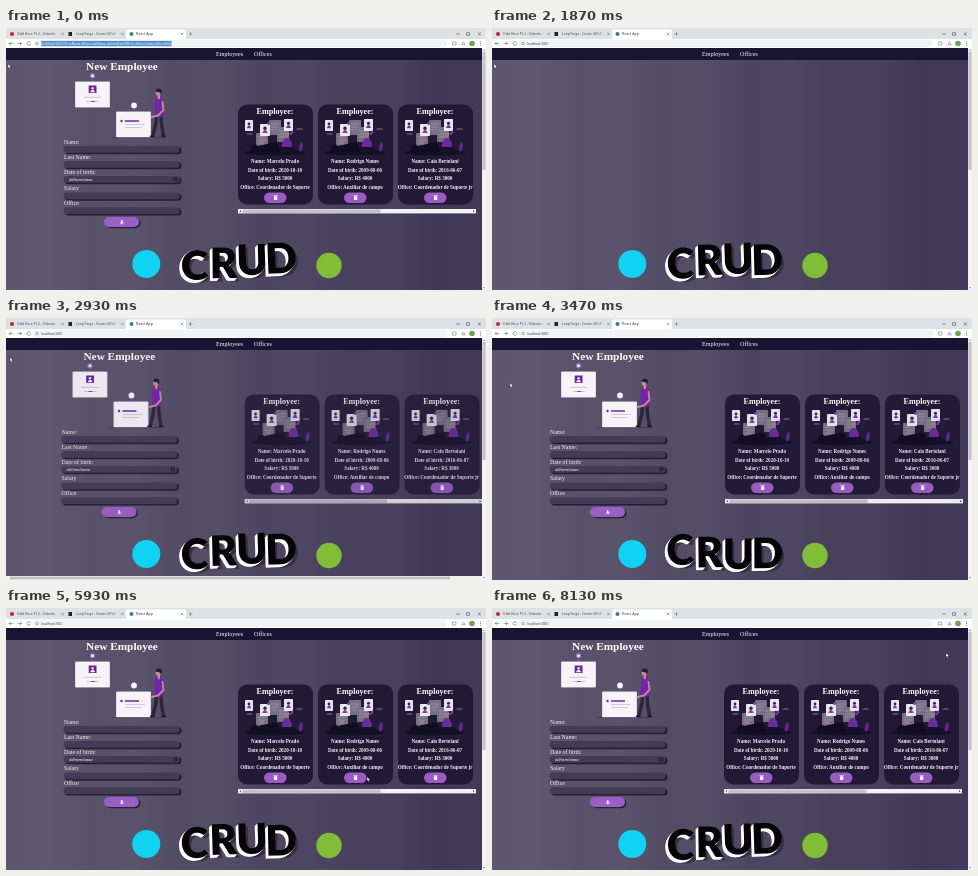
These frames come from a looping animation (480 px wide and 262 px high, 8190 ms). An HTML page:

```html
<!DOCTYPE html>
<html lang="en">
<head>
<meta charset="utf-8">
<title>Employee app</title>
<style>
  html, body { margin: 0; width: 100%; height: 100%; overflow: hidden; background: #4c4561; }
  svg { display: block; width: 100vw; height: 100vh; }
  text { white-space: pre; }
  .ui { font-family: "Open Sans", "Noto Sans", sans-serif; }
  .serif { font-family: "Liberation Serif", "Noto Serif", serif; }
  .big { font: 900 42px Lato, Inter, sans-serif; text-anchor: middle; }
</style>
</head>
<body>
<svg id="stage" viewBox="0 0 480 262" xmlns="http://www.w3.org/2000/svg"></svg>
<script>
const LOOP = 8190;
const stage = document.getElementById('stage');

const rect = (x, y, w, h, fill, r = 0, more = '') =>
  `<rect x="${x}" y="${y}" width="${w}" height="${h}" rx="${r}" fill="${fill}" ${more}/>`;
const dot = (x, y, r, fill, more = '') =>
  `<circle cx="${x}" cy="${y}" r="${r}" fill="${fill}" ${more}/>`;
const path = (d, fill, stroke = 'none', w = 1) =>
  `<path d="${d}" fill="${fill}" stroke="${stroke}" stroke-width="${w}" stroke-linecap="round" stroke-linejoin="round"/>`;
const safe = str => str.replace(/&/g, '&amp;');
const text = (x, y, size, str, fill = '#fff', cls = 'serif', more = '') =>
  `<text class="${cls}" x="${x}" y="${y}" font-size="${size}" fill="${fill}" ${more}>${safe(str)}</text>`;
const group = (id, body) => `<g id="${id}">${body}</g>`;
const MID = 'text-anchor="middle"';
const BOLD = 'font-weight="700"';

function browserBar() {
  const ink = '#5f6368';
  return rect(0, 0, 480, 11, '#dee1e6') + rect(120, 1.5, 60, 10, '#fff', 2) +
    dot(6, 6, 2, '#c8202c') + text(11, 7.3, 3.45, 'Odd Hour Pt 2 - Vidoola', '#444', 'ui') +
    rect(62.5, 4, 3.5, 4, '#222') + text(70, 7.3, 3.3, 'Loop Forge - Create GIFs f', '#444', 'ui') +
    dot(125.5, 6, 2, '#2f7f9c') + text(130, 7.3, 3.6, 'React App', '#333', 'ui') +
    path('M55.5 5l2 2m0-2l-2 2M115.5 5l2 2m0-2l-2 2M175 5l2 2m0-2l-2 2M183 6h3m-1.5-1.5v3', 'none', ink, .5) +
    path('M450.5 6h3M461 4.7h2.6v2.6h-2.6zM472 4.7l2.6 2.6m0-2.6l-2.6 2.6', 'none', '#333', .5) +
    rect(0, 11, 480, 9, '#fff') + rect(27, 11.8, 414, 7.4, '#f1f3f4', 3.7) +
    path('M6.8 15.5h-3.6l1.5-1.5m-1.5 1.5l1.5 1.5M12 15.5h3.6l-1.5-1.5m1.5 1.5l-1.5 1.5M24.4 14.5a1.8 1.8 0 1 0 .2 1.6', 'none', ink, .6) +
    dot(31, 15.5, 1.2, 'none', `stroke="${ink}" stroke-width=".5"`) +
    path('M447 14h3v3h-3zM456 16.5l1.5-2.5 1.5 2.5z', 'none', ink, .5) +
    dot(466, 15.5, 2.8, '#6fa153') +
    [13.8, 15.5, 17.2].map(y => dot(474.5, y, .5, ink)).join('') +
    group('urls', '');
}

function pageFrame() {
  return rect(0, 20, 480, 242, 'url(#bg)') + rect(0, 20, 476, 242, 'url(#streaks)') +
    rect(0, 20, 476, 12, '#181431') +
    text(210, 28, 6.1, 'Employees') + text(248, 28, 6.1, 'Offices') +
    rect(476, 20, 4, 242, '#f4f4f5') + rect(476.4, 24, 3.2, 118, '#c4c4c8') +
    path('M477 22.7l1-1.3 1 1.3zM477 259.2l1 1.3 1-1.3z', '#666');
}

function hero() {
  const board = (x, y) => rect(x, y, 35, 26, '#dcd9e5', 1) + rect(x + .8, y + .6, 33.4, 24.8, '#f6f4f9', .6);
  return dot(86.5, 47.8, 2.1, '#f2effa', 'stroke="#a263c9" stroke-width="1.2"') +
    path('M86.5 50v3', 'none', '#77708a', .5) +
    board(69, 53.5) + rect(82.7, 57.5, 7.8, 7.5, '#6d20a5') + dot(86.6, 60.2, 1.3, '#f2dbe0') +
    path('M84.2 64.3c.4-3.4 4.4-3.4 4.8 0z', '#f2eff5') +
    path('M78 69.3h17M81 73.5h3.5m5 0h3', 'none', '#b6b1c2', .7) + path('M85.5 73.5h3', 'none', '#7225a8', .9) +
    dot(128, 77.5, 2.9, '#f7f5fa') + path('M128 80v3', 'none', '#77708a', .5) +
    board(110, 83.5) + path('M119.5 93h13', 'none', '#7225a8', 1.3) +
    path('M119.5 96.5h19M119.5 99.5h16', 'none', '#c0bbca', .7) + dot(115.5, 93, 1.2, '#7225a8') +
    path('M150.5 86l-.5 9-3 12M155 86l.5 10 1.8 11', 'none', '#2c263a', 3.4) +
    path('M144.5 108.3h3.4m8 0h3.4', 'none', '#1c1628', 1.5) +
    path('M149 70c2.5-1.6 7-1.4 8.2 1.5l.8 16c-3.5 1.6-6.5 1.6-9.5 0z', '#7423ad') +
    path('M156.5 74l1 8-5.5 5.5-6.5 1.5', 'none', '#c78b91', 1.8) +
    path('M152.8 67v3', 'none', '#c78b91', 2.4) + dot(152.4, 65, 2.8, '#c78b91') +
    path('M149.4 63.5c.2-3.6 5.8-4.2 6.5-.7l-.7 4.2-1.4-2.4z', '#241d34') +
    path('M106 109.6h54', 'none', '#2d2740', .5);
}

function form() {
  const rows = [['Name:', 115.6, 118], ['Last Name:', 130.7, 133], ['Date of birth:', 145.6, 148],
    ['Salary', 162.2, 164.5], ['Office', 177.2, 179.3]];
  const field = y => rect(59, y + 1, 116.5, 7.3, '#241d35', 3.6) + rect(57.5, y, 116, 6.8, '#433c57', 3.4);
  return text(80, 42.3, 11.3, 'New Employee', '#fff', 'serif', BOLD) + hero() +
    rows.map(([label, base, top]) => text(58, base, 5.9, label, '#f1eff5') + field(top)).join('') +
    text(63, 153, 3.9, 'dd/mm/aaaa', '#dedbe5', 'ui', 'font-style="italic" font-weight="600"') +
    path('M168 150h3v3h-3zM168 150.8h3', 'none', '#15101f', .6) +
    rect(99.5, 190.3, 35, 10, '#2a213d', 5) + rect(98, 189, 35, 10, '#9a5fc4', 5) +
    dot(115.7, 193, .9, '#fff') + path('M114.3 195.6c.3-2 2.6-2 2.9 0zM117.6 194.2h.8', '#fff', '#fff', .3);
}

function teamArt() {
  const sheet = (x, y, w, h, tint) => rect(x, y, w, h, '#e9e6ee', .7) +
    dot(x + w / 2, y + h * .36, w * .17, '#302640') +
    path(`M${x + w * .22} ${y + h * .75}q${w * .28} ${-h * .55} ${w * .56} 0z`, tint);
  const folder = (x, y) => rect(x, y, 12, 15, '#777184', 1) +
    path(`M${x + 2.5} ${y + 4}h7m-7 3h7m-7 3h5`, 'none', '#a9a4b3', .6);
  return `<ellipse cx="37" cy="124.5" rx="31" ry="2.8" fill="#130f24"/>` +
    folder(31, 92) + folder(39, 99) + folder(18, 105) +
    sheet(7, 92, 8, 11, '#7b2fb4') + sheet(22, 96, 10, 12, '#9c3b9c') + sheet(46, 91, 9, 12, '#7b2fb4') +
    dot(30.5, 95.5, 1.5, '#7c35b5') + dot(54, 104, 1.5, '#7c35b5') +
    path('M9 106h5M47.5 106h6M59 101h5', 'none', '#aaa3b6', .7) +
    path('M12 124c1-8 5-9 8-6l14-3c5-1 8 2 8 9z', '#100d1f') +
    path('M41 124l4-8 8 1 9 7z', '#15102a') + path('M44 119c0-7 2-9 5-9s5 4 5 9z', '#6b2b9d') +
    dot(48.5, 108, 1.9, '#a8747f') + dot(24, 114, 1.8, '#a8747f') +
    path('M62 124c-3-5 0-9 2-10 2 4 1 8-2 10z', '#5b298a');
}

function card([name, birth, pay, office], i) {
  const line = (y, s) => text(37, y, 5.05, s, '#f3f0f7', 'serif', MID + ' font-weight="600"');
  return `<g transform="translate(${232 + i * 80} 0)">` +
    rect(0, 76.5, 75, 100, '#211936', 9) +
    text(37, 85.5, 8.1, 'Employee:', '#fff', 'serif', MID + ' ' + BOLD) + teamArt() +
    line(134.8, 'Name: ' + name) + line(143.6, 'Date of birth: ' + birth) +
    line(152.3, 'Salary: R$ ' + pay) + line(160.8, 'Office: ' + office) +
    rect(26, 164.5, 22.5, 10.5, '#9a5cc3', 5.2) +
    path('M35.8 167.7h3.6', 'none', '#fff', .7) + rect(36, 168.3, 3.2, 3.8, '#fff', .4) + '</g>';
}

function cards() {
  const people = [
    ['Marcelo Prado', '2020-10-10', 5000, 'Coordenador de Suporte'],
    ['Rodrigo Nunes', '2009-08-06', 4000, 'Auxiliar de campo'],
    ['Caio Bertolani', '2016-06-07', 3000, 'Coordenador de Suporte jr']
  ];
  return people.map(card).join('') + rect(232, 181, 238, 4.4, '#f2f1f4') +
    rect(236.5, 181.5, 138, 3.4, '#c3c1c8') +
    path('M235 182l-1.5 1.2 1.5 1.2zM467 182l1.5 1.2-1.5 1.2z', '#555');
}

function dropdown() {
  const query = 'localhost:3000/?formName=';
  const app = 'React App - ';
  // Each row: plain part, bold part, address
  const rows = [
    [app, '', 'localhost:3000/'],
    ['loc - Pesquisa no Zarvo', '', ''],
    ['loc', 'alization font awesome', ''],
    ['loc', 'alhost não funciona php', ''],
    ['loc', 'utor', ''],
    [app, '', query + 'Admin&formLastName=Admin&formDateOfBirth=&formSalary=&formOfficeDescription=' + 'A'.repeat(18)],
    [app, '', 'localhost:3000/?officeName=asda&officeDescription=asda'],
    [app, '', query + 'Marcelo&formLastName=Prado&formDateOfBirth=2020-10-10&formSalary=5000&formOffice=Suporte&id=1']
  ];
  return rect(25.5, 20, 438.5, 78.5, '#1b162a', 1, 'opacity=".3"') + rect(26, 19, 437, 78, '#fff', 1) +
    rect(26, 20, 437, 8.6, '#e6e7ea') +
    rows.map(([plain, bold, url], i) => {
      const y = 24.2 + i * 9.45;
      const icon = i && i < 5 ? dot(30.7, y - .2, 1.2, 'none', 'stroke="#8a7078" stroke-width=".5"') +
        path(`M31.6 ${y + .7}l.9 .9`, 'none', '#8a7078', .5) : dot(31, y, 1.9, '#3f7288');
      return icon + `<text class="ui" x="37" y="${y + 1.2}" font-size="3.5" fill="${i === 1 ? '#888' : '#444'}">${plain}` +
        `<tspan ${BOLD} fill="#222">${bold}</tspan><tspan fill="#6f8cc0">${safe(url)}</tspan></text>`;
    }).join('') + path('M456.8 23l2 2m0-2l-2 2', 'none', '#555', .5);
}

function lettering() {
  return [...'CRUD'].map((ch, i) => {
    const at = (dx, dy, fill, more = '') => text(dx, dy, 42, ch, fill, 'big', more);
    const side = [5, 4, 3, 2, 1].map(k => at(-k * .55, k * .55, '#fff')).join('');
    return group('letter' + i, at(2, 3.5, '#171222', 'opacity=".45"') + side + at(0, 0, '#050507'));
  }).join('');
}

stage.innerHTML = `<defs>
  <linearGradient id="bg"><stop offset="0" stop-color="#5c576e"/><stop offset=".45" stop-color="#504963"/>
    <stop offset="1" stop-color="#3d3454"/></linearGradient>
  <linearGradient id="streaks" x2=".09" spreadMethod="reflect"><stop offset="0" stop-color="#fff" stop-opacity="0"/>
    <stop offset="1" stop-color="#fff" stop-opacity=".025"/></linearGradient>
  <clipPath id="page"><rect y="32" width="476" height="230"/></clipPath></defs>` +
  pageFrame() +
  `<g clip-path="url(#page)">${group('left', form())}${group('right', cards())}</g>` +
  group('bottomBar', rect(0, 258, 476, 4, '#f1f1f1') + rect(4, 258.6, 440, 2.8, '#c1c1c4')) +
  browserBar() + group('menu', dropdown()) +
  dot(140.3, 236, 14, '#10d2f3') + lettering() + dot(323, 237.5, 12.7, '#82bd37') +
  group('cursor', path('M0 0v4.2l1-.9 .7 1.6 .8-.4-.7-1.5h1.3z', '#fff', '#171321', .35));

const $ = id => document.getElementById(id);

// Standard CSS "ease" curve, solved by bisection.
function ease(x) {
  x = Math.min(1, Math.max(0, x));
  const curve = (a, b, u) => 3 * a * u * (1 - u) ** 2 + 3 * b * u * u * (1 - u) + u ** 3;
  let lo = 0, hi = 1;
  for (let i = 0; i < 20; i++) {
    const m = (lo + hi) / 2;
    if (curve(.25, .25, m) < x) lo = m; else hi = m;
  }
  return curve(.1, 1, lo);
}

// Pointer path: time, x, y
const trail = [[0, 2, 36], [2800, 2, 36], [3400, 18, 65], [3600, 18, 65], [4330, 96, 118], [4700, 250, 60],
  [5100, 446, 120], [5400, 440, 178], [5650, 330, 180], [5900, 361, 169], [6150, 361, 169], [6600, 465, 70],
  [6920, 320, 20], [7300, 200, 30], [7750, 438, 90], [8050, 454, 45], [8190, 454, 45]];

function pointer(t) {
  const i = Math.max(1, trail.findIndex(p => p[0] > t));
  const [a, b] = [trail[i - 1], trail[i]];
  const k = (t - a[0]) / (b[0] - a[0]), s = k * k * (3 - 2 * k);
  return [a[1] + (b[1] - a[1]) * s, a[2] + (b[2] - a[2]) * s];
}

const oldUrl = 'localhost:3000/?formName=&formLastName=&formDateOfBirth=&formSalary=&formRole';
const urlStates = [[0, '', oldUrl], [470, 'l', 'ocalhost:3000'], [670, 'lo', 'calhost:3000'],
  [840, 'loc', 'alhost:3000'], [1600, 'localhost:3000', '']];
$('urls').innerHTML = urlStates.map(([, typed, picked], i) =>
  group('url' + i, text(35.3, 16.7, 3.1, typed, '#333', 'ui') +
    rect(35, 12.9, 0, 5.3, '#5590d4') + text(35, 16.7, 3.1, picked, '#fff', 'ui'))).join('');
urlStates.forEach((_, i) => {
  const [typed, box, picked] = $('url' + i).children;
  const x = 35.3 + typed.getComputedTextLength();
  box.setAttribute('x', x);
  picked.setAttribute('x', x);
  box.setAttribute('width', picked.getComputedTextLength());
});

function show(id, on) { $(id).style.display = on ? '' : 'none'; }
function slide(id, p, from) {
  $(id).setAttribute('transform', `translate(${from * (1 - p)} 0)`);
  $(id).setAttribute('opacity', p);
}

function draw(t) {
  const before = t < 1800;
  slide('left', before ? 1 : ease((t - 1900) / 1500), -39);
  slide('right', before ? 1 : ease((t - 1950) / 1950), 34);
  show('bottomBar', t >= 1950 && t < 3400);
  show('menu', t >= 470 && t < 1600);
  urlStates.forEach(([start], i) => show('url' + i, t >= start && t < (urlStates[i + 1] || [LOOP])[0]));

  for (let i = 0; i < 4; i++) {
    const bob = Math.cos(2 * Math.PI * (t * 8 / LOOP - i * .17));
    $('letter' + i).setAttribute('transform',
      `translate(${188.5 + i * 29} ${249 - i * .3 + 2.8 * bob}) rotate(${-1 + bob})`);
  }
  $('cursor').setAttribute('transform', `translate(${pointer(t)})`);
}

const start = performance.now();
function tick() {
  draw((performance.now() - start) % LOOP);
  requestAnimationFrame(tick);
}
tick();
</script>
</body>
</html>
```
